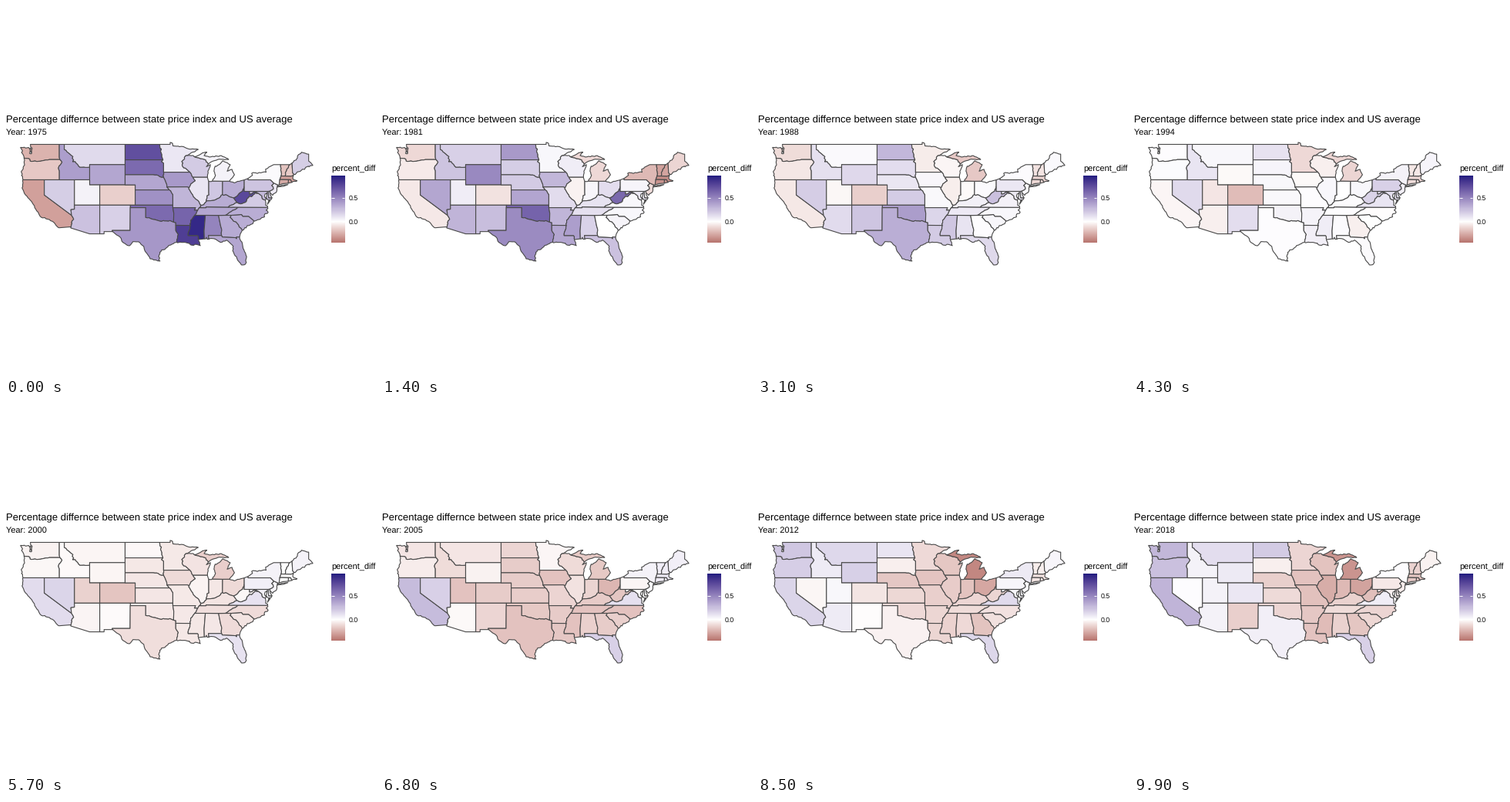
A matplotlib script that plays this animation: 480 px wide and 480 px high, repeating every 10 s.

```python
import numpy as np
import matplotlib.pyplot as plt
from matplotlib.animation import FuncAnimation
from matplotlib.collections import PolyCollection

plt.rcParams["font.family"] = "Liberation Sans"
plt.rcParams["text.hinting"] = "none"

SIZE, DPI, FRAMES, STEP = 480, 100, 100, 100
KEYS = (0, 14, 23, 43, 68, 77, 99)   # frames at which the state values are set
LOW, HIGH = -0.44, 0.95              # range of the colour scale
rng = np.random.default_rng(4)

# ---------- colour: diverging scale blended in CIE Lab ----------
TO_XYZ = np.array([[.4124, .3576, .1805], [.2126, .7152, .0722], [.0193, .1192, .9505]])
WHITE = TO_XYZ.sum(axis=1)


def to_lab(r, g, b):
    c = np.array([r, g, b]) / 255
    lin = np.where(c > .04045, ((c + .055) / 1.055) ** 2.4, c / 12.92)
    t = TO_XYZ @ lin / WHITE
    x, y, z = np.where(t > .008856, np.cbrt(t), 7.787 * t + 16 / 116)
    return np.array([116 * y - 16, 500 * (x - y), 200 * (y - z)])


def from_lab(lab):
    y = (lab[..., 0] + 16) / 116
    f = np.stack([y + lab[..., 1] / 500, y, y - lab[..., 2] / 200], axis=-1)
    xyz = np.where(f > .2069, f ** 3, (f - 16 / 116) / 7.787) * WHITE
    lin = np.clip(xyz @ np.linalg.inv(TO_XYZ).T, 0, 1)
    return np.clip(np.where(lin > .0031308, 1.055 * lin ** (1 / 2.4) - .055, 12.92 * lin), 0, 1)


BLUE, RED, PAPER = to_lab(36, 30, 128), to_lab(184, 118, 112), to_lab(255, 255, 255)


def shade(v):
    v = np.asarray(v, float)[..., None]
    up, down = np.clip(v / HIGH, 0, 1), np.clip(v / LOW, 0, 1)
    return from_lab(PAPER + up * (BLUE - PAPER) + down * (RED - PAPER))


# ---------- map helpers: degrees west and north ----------
def P(*v):
    return list(zip(v[::2], v[1::2]))


def river(*v, amp=.06):
    """Line through a few points, broken up by small random bends."""
    pts = np.array(P(*v), float)
    line = [tuple(pts[0])]
    for a, b in zip(pts, pts[1:]):
        n = int(np.ceil(np.hypot(*(b - a)) / .4))
        line += [tuple(a + (b - a) * k / n + rng.normal(0, amp, 2)) for k in range(1, n)]
        line.append(tuple(b))
    return line


def coast(*v):
    return river(*v, amp=.1)


def box(w, e, s, n):
    return P(w, s, w, n, e, n, e, s)


shapes, values, centres = [], [], []


def state(*rings, index=None):
    """Add a state; without an index its value follows from its neighbours."""
    for ring in rings:
        shapes.append([(838.1 - 6.57 * w, 179.5 + 6.57 * (49 - n)) for w, n in ring])
        values.append(None if index is None else np.array(index) / 100)
        main = np.array(rings[0])
        centres.append((main.min(axis=0) + main.max(axis=0)) / 2)


def fill_gaps():
    """Weight the known values by inverse cubed distance."""
    known = [i for i, v in enumerate(values) if v is not None]
    table = np.array([values[i] for i in known])
    spots = np.array([centres[i] for i in known])
    for i, v in enumerate(values):
        if v is None:
            w = np.hypot(*(spots - centres[i]).T) ** -3.0
            values[i] = w @ table / w.sum()


# ---------- West ----------
wa_coast = coast(124, 46.28, 124.2, 47, 124.7, 48.4)
sound = coast(124.7, 48.4, 122.9, 48.1, 122.9, 47.2, 122.5, 47.2, 122.4, 48.2, 122.75, 49)
island = P(122.8, 48.3, 122.5, 48.1, 122.6, 47.4, 122.8, 47.7)
columbia = river(124, 46.28, 122.9, 46.1, 122.8, 45.7, 121.2, 45.65, 119, 46)
snake = river(116.92, 46, 116.5, 45.5, 117.2, 44.4, 117.03, 43.8)
or_coast = coast(124.2, 42, 124.5, 42.85, 124, 45.5, 124, 46.28)
ca_coast = river(124.2, 42, 124.4, 40.4, 123.7, 39, 122.5, 37.7, 121.9, 36.5, 120.6, 34.6,
                 119.2, 34.2, 118.4, 33.8, 117.1, 32.53)
colorado = river(114.72, 32.72, 114.5, 33.9, 114.2, 34.2, 114.63, 35)
mead = P(114.63, 35, 114.75, 36.1, 114.05, 36.2, 114.05, 37)
bitterroot = river(111.05, 44.5, 113, 44.5, 113.9, 45.6, 114.4, 45.6, 114.35, 46.6, 116.05, 48)
panhandle = P(116.05, 49, 117.04, 49, 117.04, 46.4)

state(wa_coast + sound + panhandle[1:] + P(116.92, 46) + columbia[::-1], island,
      index=(-24, -12, -19, 1, -8, 18, 28))
state(columbia + snake + P(117.03, 42) + or_coast)
state(ca_coast + colorado + P(120, 39, 120, 42), index=(-30, -7, -10, -3, 26, 9, 29))
state(P(120, 42, 120, 39) + mead + P(114.05, 42), index=(19, 35, 23, 14, 18, -5, 1))
state(bitterroot + panhandle + snake + P(117.03, 42, 111.05, 42),
      index=(38, 23, 13, 10, -11, 9, 5))
state(bitterroot + P(116.05, 49, 104.05, 49, 104.05, 45, 111.05, 45),
      index=(14, 18, 2, 3, -8, 16, 13))
state(box(111.05, 104.05, 41, 45), index=(35, 47, 26, -2, -4, 24, 8))
state(P(114.05, 37, 109.05, 37, 109.05, 41, 111.05, 41, 111.05, 42, 114.05, 42),
      index=(5, 7, 1, -8, -19, 2, 5))
state(box(109.05, 102.05, 37, 41), index=(-15, -9, -11, -21, -16, -18, 9))
state(mead + P(109.05, 37, 109.05, 31.33, 111.07, 31.33, 114.8, 32.5) + colorado,
      index=(24, 29, 26, -5, -2, 9, 5))
state(P(109.05, 37, 103, 37, 103.06, 32, 106.6, 32, 106.5, 31.78, 108.2, 31.78,
        108.2, 31.33, 109.05, 31.33), index=(18, 25, 29, 13, -13, 7, -15))

# ---------- Plains ----------
red_north = river(97.23, 49, 96.8, 46.6, 96.56, 45.94)
sd_mn = P(96.56, 45.94, 96.85, 45.6, 96.45, 45.3, 96.45, 43.5)
big_sioux = river(96.45, 43.5, 96.45, 42.5)
missouri = river(98.5, 43, 97.5, 42.85, 96.45, 42.5)
missouri_ia = river(96.45, 42.5, 95.9, 41.3, 95.77, 40.58)
kaw = river(95.3, 40, 94.62, 39.1)
red_river = river(100, 34.56, 98.1, 34.13, 97.2, 33.85, 95.2, 33.95, 94.48, 33.64)
sabine = river(94.04, 32, 93.55, 31.2, 93.85, 29.7)
gulf = coast(93.85, 29.7, 95, 29.15, 97.2, 27.7, 97.4, 26.8, 97.15, 25.96)
rio = river(97.15, 25.96, 99.1, 26.4, 100.7, 29.1, 101.4, 29.77, 102.5, 29.8, 103.2, 28.98,
            104.5, 29.65, 105, 30.65, 106.5, 31.78)

state(P(104.05, 45.94, 104.05, 49) + red_north, index=(72, 40, 39, 11, -13, 4, 20))
state(P(104.05, 43, 104.05, 45.94) + sd_mn + big_sioux + missouri[::-1],
      index=(60, 19, 19, 4, -16, -5, -5))
state(P(102.05, 40, 102.05, 41, 104.05, 41, 104.05, 43) + missouri + missouri_ia + P(95.3, 40),
      index=(35, 20, 14, 3, -16, -19, -15))
state(P(102.05, 40) + kaw + P(94.62, 37, 102.05, 37))
state(red_river + P(94.43, 35.4, 94.62, 36.5, 94.62, 37, 103, 37, 103, 36.5, 100, 36.5),
      index=(60, 63, 61, 5, -17, -11, -13))
state(red_river + P(94.04, 33.55) + sabine + gulf + rio
      + P(106.6, 32, 103.06, 32, 103.04, 36.5, 100, 36.5),
      index=(41, 46, 52, 1, -19, -10, 6))

# ---------- Great Lakes ----------
superior = P(97.23, 49, 95.15, 49, 95.15, 49.38) + river(
    94.8, 49.3, 94.6, 48.7, 92.9, 48.6, 91.4, 48.07, 89.6, 48, 92.1, 46.75)
st_croix = river(92.1, 46.75, 92.3, 46.1, 92.85, 45.6, 92.75, 44.75, 91.22, 43.5)
ia_wi = river(91.22, 43.5, 90.65, 42.5)
ia_il = river(90.65, 42.5, 90.2, 41.8, 91.05, 41.2, 91.42, 40.4)
mo_il = river(89.15, 37, 89.5, 37.7, 90.3, 38.4, 90.7, 39, 91.5, 40.2, 91.42, 40.4)
wi_north = river(92.1, 46.75, 90.75, 46.8, 90.4, 46.57)
wi_mi = river(90.4, 46.57, 88.1, 45.9, 87.6, 45.1)
wi_lake = river(87.6, 45.1, 88, 44.6, 87.2, 45, 87.7, 43.7, 87.8, 42.5)
up_coast = river(90.4, 46.57, 88.4, 47.4, 87.9, 47.45, 88.45, 46.8, 87.4, 46.5, 85, 46.75,
                 84.1, 46.3, 83.6, 46, 85.5, 46.08, 86.7, 45.7, 87.6, 45.1)
mi_coast = river(83.45, 41.73, 82.45, 43, 82.95, 44.07, 83.9, 43.7, 83.3, 45, 84.75, 45.77,
                 85.5, 45, 86.25, 44.7, 86.5, 43.7, 86.2, 42.9, 86.8, 41.76)
wabash = P(87.53, 41.7) + river(87.53, 39.35, 87.95, 38.2, 88.05, 37.8)
erie = river(83.45, 41.73, 82.5, 41.4, 80.52, 41.98)
ohio_wv = river(80.52, 40.64, 80.85, 39.75, 81.75, 39, 82.6, 38.4)
ohio_ky = river(82.6, 38.4, 83.3, 38.6, 84.82, 39.1)
ohio_in = river(84.82, 39.1, 85.5, 38.4, 86.5, 37.95, 88.05, 37.8)
ohio_il = river(88.05, 37.8, 88.5, 37.1, 89.15, 37)

state(red_north + sd_mn + st_croix[::-1] + superior[::-1],
      index=(9, 3, -2, -12, -3, -11, -13))
state(ia_wi + ia_il + P(91.73, 40.6) + missouri_ia[::-1] + big_sioux[::-1],
      index=(40, 28, 7, -2, -19, -18, -19))
state(st_croix + ia_wi + wi_lake[::-1] + wi_mi[::-1] + wi_north[::-1])
state(ia_il + mo_il[::-1] + ohio_il[::-1] + wabash[::-1] + P(87.65, 42, 87.8, 42.5),
      index=(10, -4, -11, 3, -9, -10, -26))
state(wabash + ohio_in[::-1] + P(84.8, 41.72, 86.8, 41.76, 87.1, 41.65))
state(ohio_ky + P(84.8, 41.72) + erie + ohio_wv, index=(32, 13, 1, 3, -23, -27, -29))
state(P(86.8, 41.76, 84.8, 41.72) + mi_coast, up_coast + wi_mi[::-1],
      index=(5, -12, -20, -13, -17, -41, -34))

# ---------- South ----------
la_coast = coast(93.85, 29.7, 92, 29.6, 90.9, 29.1, 90, 29.25, 89.2, 29, 89.55, 30.2)
pearl = river(89.55, 30.2, 89.75, 31) + river(91.6, 31, 91.15, 33)
delta = river(91.15, 33, 91.1, 34, 90.3, 35)
memphis = river(90.3, 35, 89.7, 36)
bootheel = P(89.7, 36, 90.37, 36, 90.15, 36.5)
mo_tn = river(89.4, 36.5, 89.7, 36)
ms_al = P(88.2, 35, 88.45, 31.9, 88.4, 30.35)
mobile = P(88.1, 30.35, 88, 30.65, 87.8, 30.25, 87.5, 30.3)
chatt = river(85, 31, 85, 32.3) + P(85.18, 32.87, 85.6, 34.98)
savannah = river(83.1, 35, 83.3, 34.6, 81.9, 33.4, 80.9, 32.05)
ga_fl = P(81.45, 30.7, 82.05, 30.7, 82.05, 30.36, 82.2, 30.57, 84.86, 30.7, 85, 31)
fl_coast = river(87.5, 30.3, 86.5, 30.38, 85.2, 29.65, 84, 30.1, 82.7, 28.9, 82.8, 28,
                 81.8, 26.1, 81.1, 25.2, 80.4, 25.25, 80.05, 26.8, 81.45, 30.7)
sc_coast = coast(80.9, 32.05, 79.2, 33.2, 78.55, 33.87)
nc_sc = P(78.55, 33.87, 79.67, 34.8, 80.8, 34.8, 81.05, 35.15, 83.1, 35)
nc_coast = coast(78.55, 33.87, 77.9, 34.1, 76.5, 34.7, 76.5, 35.2, 75.8, 35.6, 76.2, 36,
                 75.9, 36.55)
smoky = river(84.3, 35, 83.1, 35.75, 81.68, 36.58)
cumberland = river(83.68, 36.6, 81.97, 37.54)
tug = river(81.97, 37.54, 82.6, 38.4)
wv_va = river(81.97, 37.54, 81.25, 37.25, 80.3, 37.55, 79.65, 38.5, 78.9, 38.8,
              78.35, 39.4, 77.72, 39.32)
potomac_w = river(77.72, 39.32, 78.4, 39.6, 79.48, 39.2)
potomac_e = river(77.72, 39.32, 77.05, 38.8, 76.95, 38.25, 76.35, 38)
va_coast = coast(76.35, 38, 76.3, 37, 75.9, 36.55)
bay = coast(76.35, 38, 76.4, 39.2, 76, 39.5, 76.2, 38.5, 75.7, 37.95, 75.05, 38.45)

state(mo_il + P(91.73, 40.6, 95.77, 40.58) + kaw + P(94.62, 36.5) + bootheel[::-1]
      + mo_tn[::-1] + P(89.1, 36.7))
state(delta + memphis + bootheel
      + P(94.62, 36.5, 94.43, 35.4, 94.48, 33.64, 94.04, 33.55, 94.04, 33.02))
state(sabine + la_coast + pearl + P(94.04, 33.02))
state(pearl + delta + ms_al, index=(90, 38, 32, 7, -19, -10, -21))
state(ms_al + mobile + P(87.6, 31) + chatt)
state(chatt + savannah + P(81.3, 31.3) + ga_fl, index=(33, 0, 5, -5, -16, -19, -18))
state(ga_fl + P(87.6, 31) + fl_coast, index=(35, 24, 23, 2, 18, 14, 18))
state(savannah + sc_coast + nc_sc)
state(nc_sc + smoky + nc_coast[::-1], index=(32, 3, 6, -1, -19, -7, -13))
state(smoky + P(83.68, 36.6, 88.07, 36.65, 88.07, 36.5) + mo_tn + memphis[::-1]
      + P(88.2, 35, 85.6, 34.98), index=(35, 12, 13, 1, -19, -11, -11))
state(cumberland + tug + ohio_ky + ohio_in + ohio_il
      + P(89.1, 36.7, 89.4, 36.5, 88.07, 36.5, 88.07, 36.65))
state(ohio_wv + tug[::-1] + wv_va + potomac_w + P(79.48, 39.72, 80.52, 39.72),
      index=(75, 61, 29, 17, -18, -9, -20))
state(cumberland + wv_va + potomac_e + va_coast + P(81.68, 36.58),
      P(75.65, 37.95, 75.4, 37.9, 75.95, 37.15), index=(20, 3, 2, 10, 12, 18, 7))

# ---------- Northeast ----------
delaware = river(75.4, 39.8, 74.75, 40.2, 75.1, 40.9, 74.7, 41.36)
pa_ny = P(74.7, 41.36, 75.35, 42, 79.76, 42, 79.76, 42.27)
ontario = river(79.76, 42.27, 78.9, 42.9, 79.05, 43.27, 76.2, 43.5, 76.3, 44.1, 74.7, 45)
champlain = river(73.35, 45, 73.25, 42.75)
conn = river(71.5, 45, 72.4, 43.4, 72.46, 42.73)

state(potomac_w[::-1] + potomac_e + bay + P(75.7, 38.45, 75.79, 39.72, 79.48, 39.72))
state(P(75.79, 39.72, 75.4, 39.8, 75.4, 39.1, 75.05, 38.45, 75.7, 38.45))
state(P(80.52, 41.98, 80.52, 39.72, 75.79, 39.72) + delaware + pa_ny,
      index=(23, 4, 3, 18, -3, 10, -7))
state(delaware + coast(73.9, 41, 74.1, 40.4, 74.1, 39.75, 74.9, 38.95, 75.5, 39.5))
state(pa_ny + ontario + champlain + P(73.5, 42.05, 73.5, 41.3, 73.65, 41, 74, 40.7, 73.9, 41),
      P(74, 40.6, 73, 40.95, 71.9, 41.05, 72.8, 40.72), index=(2, -22, -1, 5, 5, 12, 1))
state(champlain + conn[::-1])
state(conn + P(71.3, 42.7, 70.82, 42.87, 70.7, 43.07, 70.98, 43.4, 71.08, 45.3))
state(river(71.08, 45.3, 70.3, 45.9, 70, 46.7, 69.22, 47.45, 67.8, 47.07)
      + coast(67.8, 45.7, 66.98, 44.85, 69, 44.1, 70.7, 43.07) + P(70.98, 43.4),
      index=(19, -13, 1, 4, 6, 8, -4))
state(P(73.25, 42.75, 71.3, 42.7) + coast(70.82, 42.87, 70.9, 42.2, 70.1, 41.8, 71.12, 41.5)
      + P(71.38, 42.02, 73.5, 42.05), index=(-30, -36, -14, -12, 8, -4, -18))
state(P(71.8, 42.02, 71.38, 42.02, 71.12, 41.5, 71.85, 41.32))
state(P(73.5, 42.05, 71.8, 42.02, 71.85, 41.32, 72.9, 41.25, 73.65, 41))
fill_gaps()

# ---------- stage ----------
fig = plt.figure(figsize=(SIZE / DPI, SIZE / DPI), dpi=DPI, facecolor="white")
ax = fig.add_axes([0, 0, 1, 1])
ax.axis("off")


def label(x, y, text, px):
    return ax.text(x, y, text, fontsize=px * 72 / DPI, color="black")


states = PolyCollection(shapes, edgecolors="#4a4a4a", linewidths=1.12 * 72 / DPI,
                        joinstyle="round", snap=False)
ax.add_collection(states)

label(0, 151, "Percentage differnce between state price index and US average", 13.17)
year = label(0, 167, "", 11)
label(422, 215, "percent_diff", 11)

LEFT, RIGHT, TOP, BOTTOM = 422.3, 439.4, 220.8, 307.2
ramp = shade(np.linspace(HIGH, LOW, 86))[:, None, :]
ax.imshow(ramp, extent=(LEFT, RIGHT, BOTTOM, TOP), aspect="auto", interpolation="nearest")
for v in (0.5, 0.0):
    y = TOP + (HIGH - v) / (HIGH - LOW) * (BOTTOM - TOP)
    for x in (LEFT, RIGHT - 3.4):
        ax.plot((x, x + 3.4), (y, y), color="white", lw=0.7, solid_capstyle="butt")
    label(445, y + 3.2, f"{v:.1f}", 8.8)

ax.set_xlim(0, SIZE)
ax.set_ylim(SIZE, 0)


def update(frame):
    states.set_facecolor(shade([np.interp(frame, KEYS, v) for v in values]))
    year.set_text(f"Year: {round(1975 + 43 * frame / (FRAMES - 1))}")
    return states, year


anim = FuncAnimation(fig, update, frames=FRAMES, interval=STEP, repeat=True, repeat_delay=0)
plt.show()
```
